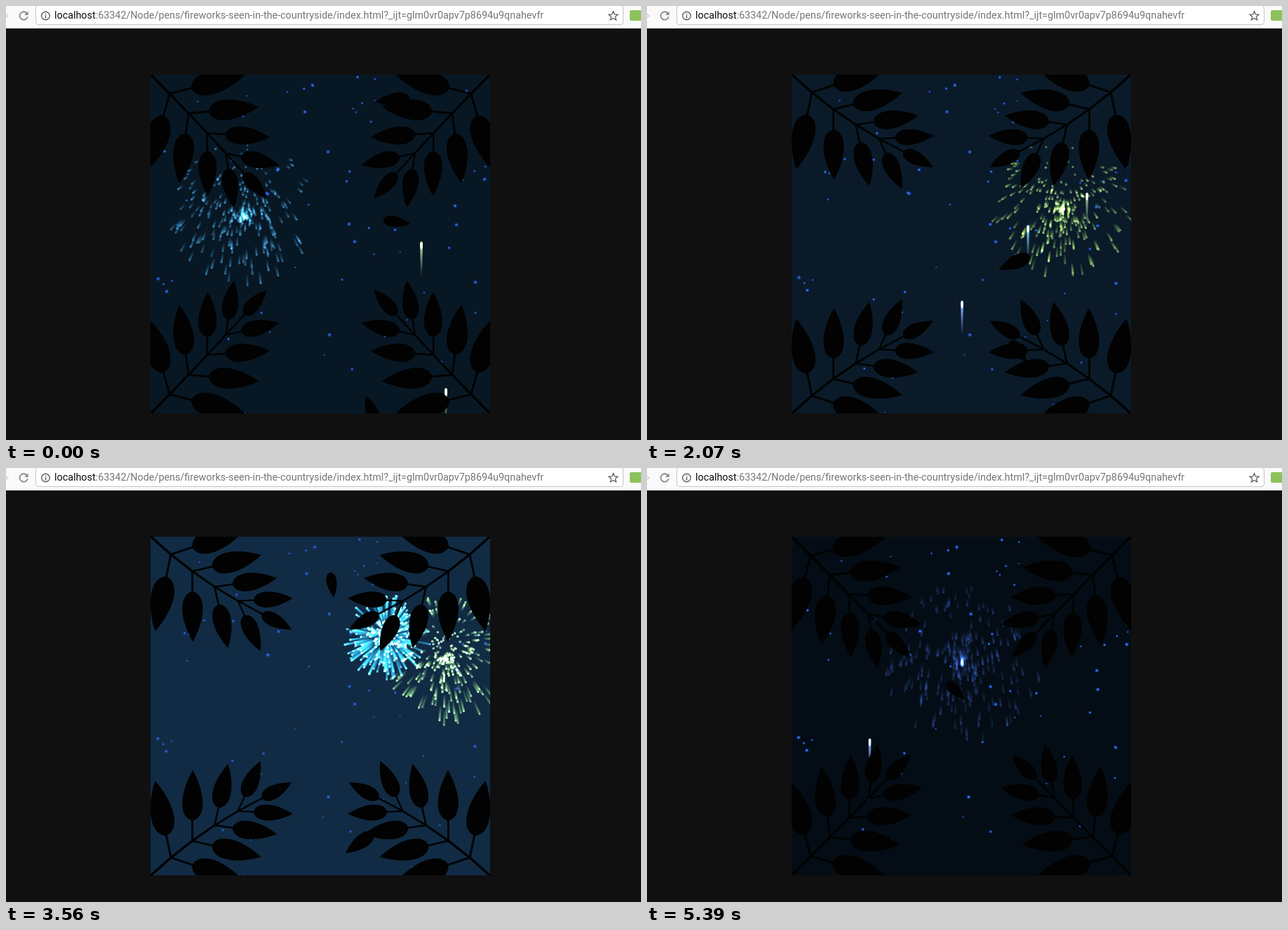
Write an HTML page with a canvas that moves like this. It is 905 px wide and 619 px high and loops after 5.49 s.

```html
<!DOCTYPE html>
<html lang="en">
<head>
<meta charset="utf-8">
<title>Fireworks</title>
<style>
  html, body { margin: 0; width: 100%; height: 100%; overflow: hidden; background: #101010; }
  .bar { position: absolute; left: 0; top: 0; width: 905px; height: 32px; overflow: hidden; background: #fafafa; }
  .field { position: absolute; left: 42px; top: -1px; width: 836px; height: 26px; border: 1px solid #c4c4c4; border-radius: 4px; background: #fff; }
  .url { position: absolute; left: 69px; top: 4px; font: 14.35px/20px Roboto, "Liberation Sans", sans-serif; color: #757575; white-space: nowrap; }
  .url b { font-weight: 400; color: #0c0c0c; }
  .icons { position: absolute; left: 0; top: 0; }
  canvas { position: absolute; left: 206px; top: 98px; }
</style>
</head>
<body>
<div class="bar">
  <div class="field"></div>
  <div class="url"><b>localhost</b>:63342/Node/pens/fireworks-seen-in-the-countryside/index.html?_ijt=glm0vr0apv7p8694u9qnahevfr</div>
  <svg class="icons" width="905" height="32" fill="none">
    <path d="M-3 9 L3 14 L-3 19" stroke="#d4d4d4" stroke-width="1.6"/>
    <path d="M29.6 10.3 A5.7 5.7 0 1 0 30.8 15.2" stroke="#8a8a8a" stroke-width="1.8"/>
    <path d="M31.6 7.6 V13 H26.2 Z" fill="#8a8a8a"/>
    <circle cx="56.5" cy="14" r="5.8" stroke="#5f5f5f" stroke-width="1.4"/>
    <path d="M56.5 13 V17.4 M56.5 10.4 V12" stroke="#5f5f5f" stroke-width="1.5"/>
    <path d="M865.5 7.6 L867.3 12 L872 12.3 L868.4 15.3 L869.6 19.9 L865.5 17.4 L861.4 19.9 L862.6 15.3 L859 12.3 L863.7 12 Z" stroke="#606060" stroke-width="1.3"/>
    <rect x="889" y="6" width="17" height="15" rx="2" fill="#8cc25a"/>
  </svg>
</div>
<canvas id="sky" width="484" height="483"></canvas>
<script>
const LOOP = 5490;
const CX = 448, CY = 339.5, HALF = 242;
const ctx = document.getElementById('sky').getContext('2d');
const clamp = v => Math.max(0, Math.min(1, v));
const lerp = (a, b, u) => a + (b - a) * u;
const rad = d => d * Math.PI / 180;
const rgba = (rgb, alpha) => `rgba(${rgb},${alpha})`;

// The picture advances in even runs of steps: [first, last, count] in ms
const steps = [[0, 1180, 9], [1330, 2360, 8], [2510, 3410, 7], [3560, 4590, 8], [4740, 5390, 5]]
  .flatMap(([a, b, n]) => Array.from({ length: n }, (_, i) =>
    Math.floor(lerp(a, b, i / (n - 1)) / 10) * 10));

function seeded(seed) {
  return () => {
    seed = (seed + 0x6D2B79F5) | 0;
    let n = Math.imul(seed ^ seed >>> 15, 1 | seed);
    n = n + Math.imul(n ^ n >>> 7, 61 | n) ^ n;
    return ((n ^ n >>> 14) >>> 0) / 4294967296;
  };
}

// A few leading stars, then a random scatter of smaller ones
const scatter = seeded(5);
const stars = [
  [437, 113], [426, 151], [459, 208], [387, 234], [373, 268], [489, 311], [461, 469],
  [217, 389], [229, 407], [640, 285], [642, 312], [682, 247], [669, 394], [497, 336]
].map(([x, y]) => ({ x, y, r: 1.6 }));
while (stars.length < 76) {
  stars.push({
    x: CX + HALF * (2 * scatter() - 1),
    y: CY + HALF * (2 * scatter() - 1),
    r: 0.6 + 0.8 * scatter()
  });
}

// Each shell slows to its top at the apex time and bursts there
const shells = [
  { x: 339, top: 280, apex: -960, burst: -960, rgb: [60, 165, 225] },
  { x: 592, top: 274, apex: 1200, burst: 1200, rgb: [150, 200, 70] },
  { x: 627, top: 264, apex: 2470, burst: 2900, rgb: [150, 205, 90] },
  { x: 543, top: 240, apex: 3350, burst: 3245, rgb: [50, 180, 220] },
  { x: 449, top: 240, apex: 4050, burst: 4050, rgb: [75, 110, 245] },
  { x: 317.5, top: 246, apex: 7150, burst: 7150, rgb: [75, 110, 245] }
];
shells.forEach((s, i) => {
  const rnd = seeded(11 + i * 37);
  s.pale = s.rgb.map(c => Math.round(lerp(c, 255, 0.4)));
  s.sparks = Array.from({ length: 260 }, () => ({
    angle: rnd() * 2 * Math.PI, reach: 118 * rnd() ** 1.15, glow: 0.5 + 0.5 * rnd()
  }));
});

// Place and heading at t = 0; larger leaves fall faster
const loose = [
  { x: 557, y: 308, rot: 8, spin: 0.0214, size: 39 },
  { x: 551, y: 134, rot: 174, spin: -0.0084, size: 49 },
  { x: 521, y: 577, rot: -112, spin: 0.01, size: 46 },
  { x: 512, y: -128, rot: 153.5, spin: -0.0203, size: 36 }
];

const leafShape = new Path2D('M0 0 C.06 -.27 .52 -.27 1 0 C.52 .27 .06 .27 0 0Z');

function leaf(size) {
  ctx.save();
  ctx.scale(size, size);
  ctx.fill(leafShape);
  ctx.restore();
}

function twig(length, width) {
  ctx.lineWidth = width;
  ctx.beginPath();
  ctx.moveTo(0, 0);
  ctx.lineTo(length, 0);
  ctx.stroke();
}

function branch(bend) {
  const seg = 38.8;
  ctx.rotate(rad(45));
  for (let k = 1; k <= 5; k++) {
    const size = 88 - 8 * k;
    ctx.rotate(-rad(bend));
    twig(seg + 1, 3.7 - 0.25 * k);
    ctx.translate(seg, 0);
    if (k === 5) { leaf(size); break; }
    for (const side of [-1, 1]) {
      ctx.save();
      ctx.rotate(side * rad(60 * (8 - k) / 7));
      twig(size * 0.4 + 3, 3.1 - 0.2 * k);
      ctx.translate(size * 0.4, 0);
      leaf(size);
      ctx.restore();
    }
  }
}

function foliage(t) {
  ctx.fillStyle = ctx.strokeStyle = '#010201';
  const bend = 0.5 + 3.35 * Math.cos(0.000677 * (t - 2785));
  for (const sx of [-1, 1]) for (const sy of [-1, 1]) {
    ctx.save();
    ctx.translate(CX, CY);
    ctx.scale(sx, sy);
    ctx.translate(-HALF, -HALF);
    branch(bend);
    ctx.restore();
  }
  for (const l of loose) {
    ctx.save();
    ctx.translate(l.x - 0.0133 * t, l.y + 0.0023 * l.size * t);
    ctx.rotate(rad(l.rot + l.spin * t));
    ctx.translate(-l.size / 2, 0);
    leaf(l.size);
    ctx.restore();
  }
}

function dot(x, y, r, style) {
  ctx.fillStyle = style;
  ctx.beginPath();
  ctx.arc(x, y, r, 0, 2 * Math.PI);
  ctx.fill();
}

// The whole field of stars turns slowly about the centre
function starfield(t, alpha) {
  const turn = 3.7e-6 * t, c = Math.cos(turn), s = Math.sin(turn);
  for (const star of stars) {
    const dx = star.x - CX, dy = star.y - CY;
    const x = CX + dx * c - dy * s, y = CY + dx * s + dy * c;
    dot(x, y, star.r * 1.8, rgba([30, 85, 220], alpha * 0.4));
    dot(x, y, star.r, rgba([52, 116, 255], alpha));
  }
}

function rocket(s, t) {
  const rise = Math.max(0, s.apex - t);
  const y = s.top + 4.7e-5 * rise * rise;
  const left = s.burst - t;
  if (left < 200) return dot(s.x - 0.5, y, 2.3, '#fff');
  const alpha = clamp((left - 600) / 300);
  const tail = ctx.createLinearGradient(0, y - 6, 0, y + 44);
  tail.addColorStop(0, rgba(s.pale, alpha));
  tail.addColorStop(0.25, rgba(s.pale, alpha * 0.75));
  tail.addColorStop(1, rgba(s.pale, 0));
  ctx.fillStyle = tail;
  ctx.beginPath();
  ctx.moveTo(s.x - 2, y - 4);
  ctx.quadraticCurveTo(s.x, y - 8, s.x + 2, y - 4);
  ctx.lineTo(s.x + 0.9, y + 44);
  ctx.lineTo(s.x - 0.9, y + 44);
  ctx.fill();
  ctx.fillStyle = rgba([255, 255, 235], alpha * 0.5);
  ctx.beginPath();
  ctx.ellipse(s.x, y, 1.6, 5, 0, 0, 2 * Math.PI);
  ctx.fill();
}

function sparkAt(s, p, age) {
  const r = p.reach * (1 - Math.exp(-age / 424));
  return [s.x + Math.cos(p.angle) * r, s.top + Math.sin(p.angle) * r + 2.25e-5 * age * age];
}

function burst(s, age) {
  const fade = clamp(1 - (age - 300) / 1400) ** 0.8;
  if (!fade) return;
  ctx.lineWidth = 3;
  for (const p of s.sparks) {
    const [x, y] = sparkAt(s, p, age);
    const [px, py] = sparkAt(s, p, Math.max(0, age - 220));
    const alpha = fade * p.glow;
    const streak = ctx.createLinearGradient(px, py, x, y);
    streak.addColorStop(0, rgba(s.rgb, 0));
    streak.addColorStop(1, rgba(s.rgb, alpha));
    ctx.strokeStyle = streak;
    ctx.beginPath();
    ctx.moveTo(px, py);
    ctx.lineTo(x, y);
    ctx.stroke();
    const heat = clamp(1.2 - age / 900) * clamp(1.35 - p.reach / 118);
    if (heat) dot(x, y, 1.7, rgba([255, 255, 235], alpha * heat));
  }
}

// Sky light before and after a burst
const flash = age => clamp(age < 0 ? 1 + age / 195 : 1 - (age - 320) / 950);

function draw(t) {
  const light = Math.max(...shells.map(s => flash(t - s.burst)));
  const sky = [[4, 17], [13, 43], [21, 68]].map(([a, b]) => Math.round(lerp(a, b, light)));
  ctx.setTransform(1, 0, 0, 1, HALF - CX, HALF - CY - 0.5);
  ctx.fillStyle = `rgb(${sky})`;
  ctx.fillRect(206, 98, 484, 483);
  starfield(t, 1 - 0.25 * light);
  ctx.globalCompositeOperation = 'lighter';
  ctx.lineCap = 'round';
  for (const s of shells) {
    if (t >= s.burst) burst(s, t - s.burst);
    else rocket(s, t);
  }
  ctx.globalCompositeOperation = 'source-over';
  ctx.lineCap = 'butt';
  foliage(t);
}

const start = performance.now();
let shown = -1;
function tick() {
  const t = (performance.now() - start) % LOOP;
  const now = steps.filter(s => s <= t).pop();
  if (now !== shown) draw(shown = now);
  requestAnimationFrame(tick);
}
tick();
</script>
</body>
</html>
```
